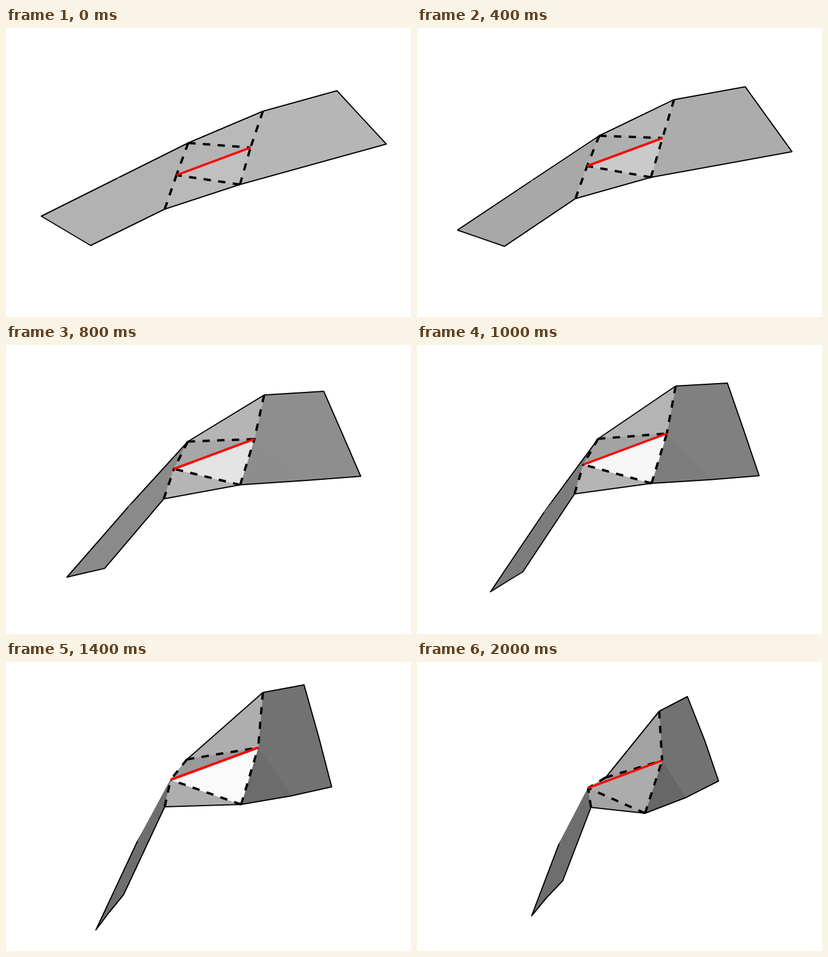
An HTML page with a canvas for the animation above (2.2 s loop, 689 by 493 pixels).

```html
<!DOCTYPE html>
<html lang="en">
<head>
<meta charset="utf-8">
<title>Folding strip</title>
<style>
  html, body { margin: 0; width: 100%; height: 100%; overflow: hidden; background: #fff; }
  canvas { display: block; }
</style>
</head>
<body>
<canvas id="stage" width="689" height="493"></canvas>
<script>
const ctx = document.getElementById('stage').getContext('2d');
const STEP_MS = 200, STEPS = 11;

// Keyed by fold stage: x, y of each corner in NAMES, then how far the flaps bow.
const NAMES = 'LMABRSDCPQ';
const POSES = {
  0: [57, 299, 142, 372, 311, 209, 437, 162, 566, 112, 651, 184, 398, 281, 270, 327, 290, 268, 416, 221, 0],
  1: [60, 321, 144, 371, 310, 196, 437, 142, 563, 107, 647, 198, 398, 267, 270, 309, 290, 251, 416, 204, 0],
  3: [84, 370, 157, 376, 310, 173, 438, 103, 551, 91, 623, 220, 398, 245, 269, 275, 288, 222, 420, 173, 1],
  5: [125, 421, 180, 387, 308, 160, 440, 70, 528, 65, 582, 223, 399, 236, 268, 254, 283, 204, 425, 151, 4],
  7: [153, 457, 200, 397, 308, 166, 437, 52, 507, 39, 554, 213, 400, 243, 270, 247, 280, 201, 429, 146, 10],
  8: [190, 428, 233, 373, 316, 186, 421, 81, 475, 66, 516, 212, 392, 247, 287, 246, 290, 210, 417, 163, 10],
  10: [195, 433, 248, 373, 321, 197, 412, 84, 460, 59, 513, 203, 388, 258, 296, 248, 291, 215, 417, 168, 19]
};

// Lagrange interpolation through the poses on the same side of the zoom change.
function poseAt(stage) {
  const knots = stage <= 7 ? [0, 1, 3, 5, 7] : [8, 10];
  const weights = knots.map(k => knots.reduce(
    (w, other) => other === k ? w : w * (stage - other) / (k - other), 1));
  return POSES[0].map((_, i) => knots.reduce((sum, k, n) => sum + weights[n] * POSES[k][i], 0));
}

function between(a, b, t, dx, dy) {
  return [a[0] + (b[0] - a[0]) * t + dx, a[1] + (b[1] - a[1]) * t + dy];
}

function cornersAt(stage) {
  const pose = poseAt(stage), bend = pose[20], p = {};
  [...NAMES].forEach((name, i) => p[name] = [pose[2 * i], pose[2 * i + 1]]);
  p.K = between(p.A, p.L, 0.48, -bend, 0);
  p.N = between(p.L, p.M, 0.5, -0.1 * bend, 0);
  p.E = between(p.D, p.S, 0.55, 0, 0.2 * bend);
  p.T = between(p.R, p.S, 0.52, 0.1 * bend, 0);
  return { p, bend };
}

function draw(stage) {
  const { p, bend } = cornersAt(stage);
  const folded = Math.min(stage, 7);
  const flap = 148 + 36 * Math.cos(Math.PI * folded / 7);
  const side = 185 - 0.22 * stage * stage;
  const upper = 184 - 4.3 * folded;
  const lower = stage > 7 ? 262 - 30 * (stage - 7)
                          : Math.min(250, 186 + 5 * stage + 1.4 * stage * stage);

  function trace(path) {
    ctx.beginPath();
    for (const name of path) ctx.lineTo(...p[name]);
  }
  function face(path, shade) {
    const level = Math.round(shade);
    ctx.fillStyle = ctx.strokeStyle = `rgb(${level},${level},${level})`;
    ctx.lineWidth = 0.7;
    trace(path);
    ctx.closePath();
    ctx.fill();
    ctx.stroke();
  }
  function line(path, width, color = '#000', dash = []) {
    ctx.strokeStyle = color;
    ctx.lineWidth = width;
    ctx.setLineDash(dash);
    trace(path);
    ctx.stroke();
    ctx.setLineDash([]);
  }

  ctx.clearRect(0, 0, 689, 493);
  ctx.lineJoin = 'round';

  face('APK', flap - 2);
  line('AK', 2);
  face('LKPCMN', flap - 2);
  line('KLNMC', 2);
  face('BRTSEDQ', flap + 2);
  face('QDE', flap + 2 - 0.6 * bend);
  line('BRTSED', 2);

  face('ABQ', side);
  face('PCD', side);
  face('APQ', upper);
  face('PQD', lower);
  line('AB', 2);
  line('CD', 2);

  for (const crease of ['AQ', 'DP', 'AP', 'CP', 'BQ', 'DQ']) line(crease, 4, '#000', [12.5, 12.5]);
  line('PQ', 4, '#f00');
}

function tick() {
  const step = Math.floor(performance.now() / STEP_MS) % STEPS;
  // The loop opens slightly folded, lies flat once, then folds steadily.
  draw(step < 2 ? 1 - step : step);
  requestAnimationFrame(tick);
}
tick();
</script>
</body>
</html>
```
